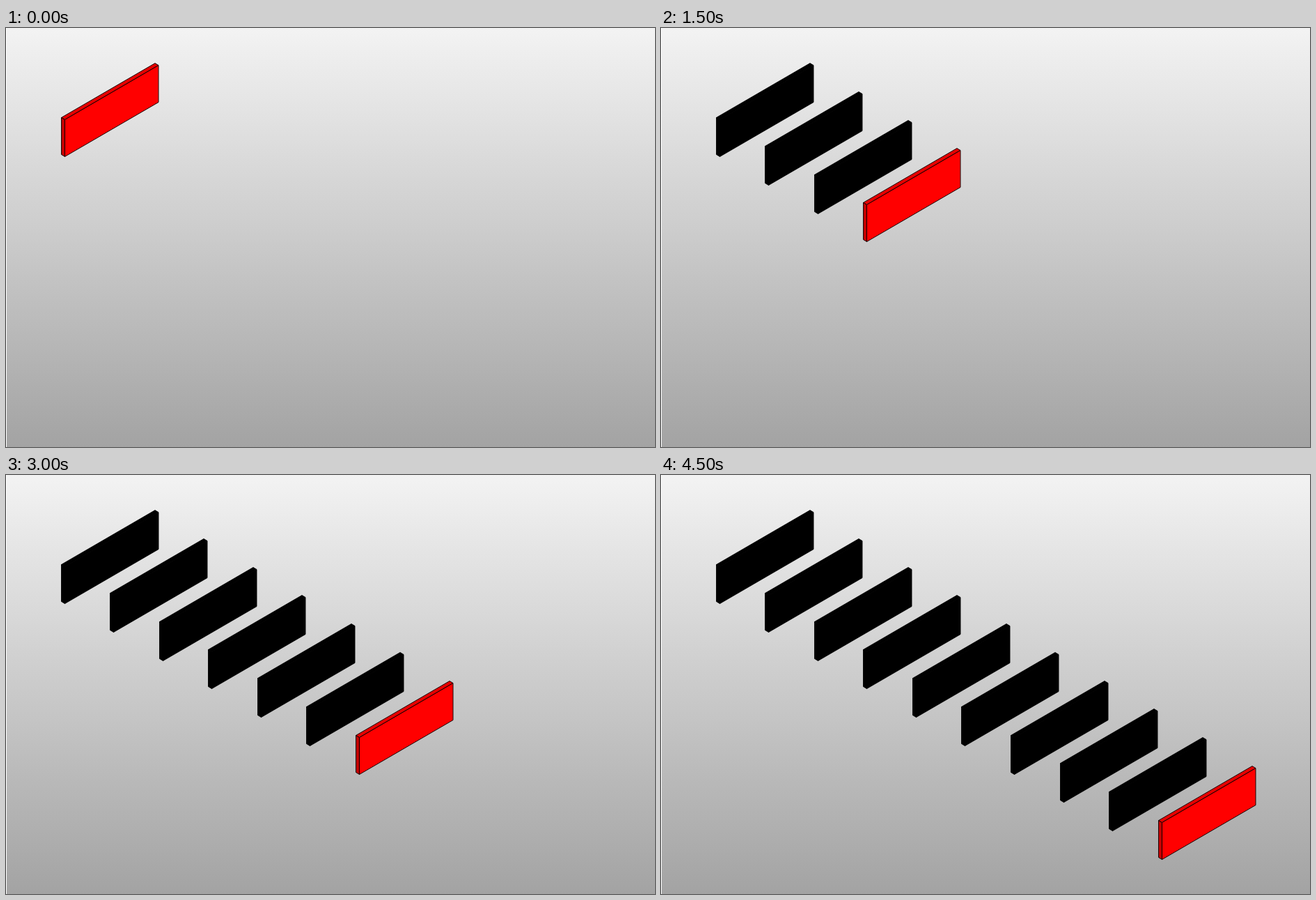
Animation of 932x601 px, one loop 5 s. Source, as an HTML page with a canvas:

```html
<!DOCTYPE html>
<html lang="en">
<head>
<meta charset="utf-8">
<title>Row of slabs</title>
<style>
  html, body { margin: 0; width: 100%; height: 100%; overflow: hidden; }
  canvas { display: block; }
</style>
</head>
<body>
<canvas id="stage" width="932" height="601"></canvas>
<script>
const ctx = document.getElementById('stage').getContext('2d');
const STEP_MS = 500, COUNT = 10;

const sky = ctx.createLinearGradient(0, 0, 0, 601);
sky.addColorStop(0, '#f3f3f3');
sky.addColorStop(1, '#a3a3a3');

// Corners of the first slab
const backTop = [214, 50.5], rightTop = [219, 53.5], rightBottom = [219, 106.5];
const frontTop = [84.5, 131.5], frontBottom = [84.5, 184.5];
const leftTop = [79.5, 128.5], leftBottom = [79.5, 181.5];

const FACES = [
  { color: '#e60000', points: [leftTop, backTop, rightTop, frontTop] },
  { color: '#c40000', points: [leftTop, frontTop, frontBottom, leftBottom] },
  { color: '#ff0000', points: [frontTop, rightTop, rightBottom, frontBottom] }
];

function drawSlab(index, active) {
  ctx.save();
  ctx.translate(Math.floor(70.58 * index), Math.floor(0.6 + 40.74 * index));
  for (const { color, points } of FACES) {
    ctx.beginPath();
    for (const [x, y] of points) ctx.lineTo(x, y);
    ctx.closePath();
    ctx.fillStyle = active ? color : '#000';
    ctx.fill();
    ctx.stroke();
  }
  ctx.restore();
}

function draw(now) {
  const current = Math.floor(now / STEP_MS) % COUNT;
  ctx.fillStyle = '#fff';
  ctx.fillRect(0, 0, 1, 601);
  ctx.fillStyle = sky;
  ctx.fillRect(1, 0, 931, 601);
  ctx.strokeStyle = '#000';
  ctx.lineWidth = 0.9;
  ctx.lineJoin = 'round';
  for (let i = 0; i <= current; i++) drawSlab(i, i === current);
}

const start = performance.now();
function tick() {
  draw(performance.now() - start);
  requestAnimationFrame(tick);
}
tick();
</script>
</body>
</html>
```
